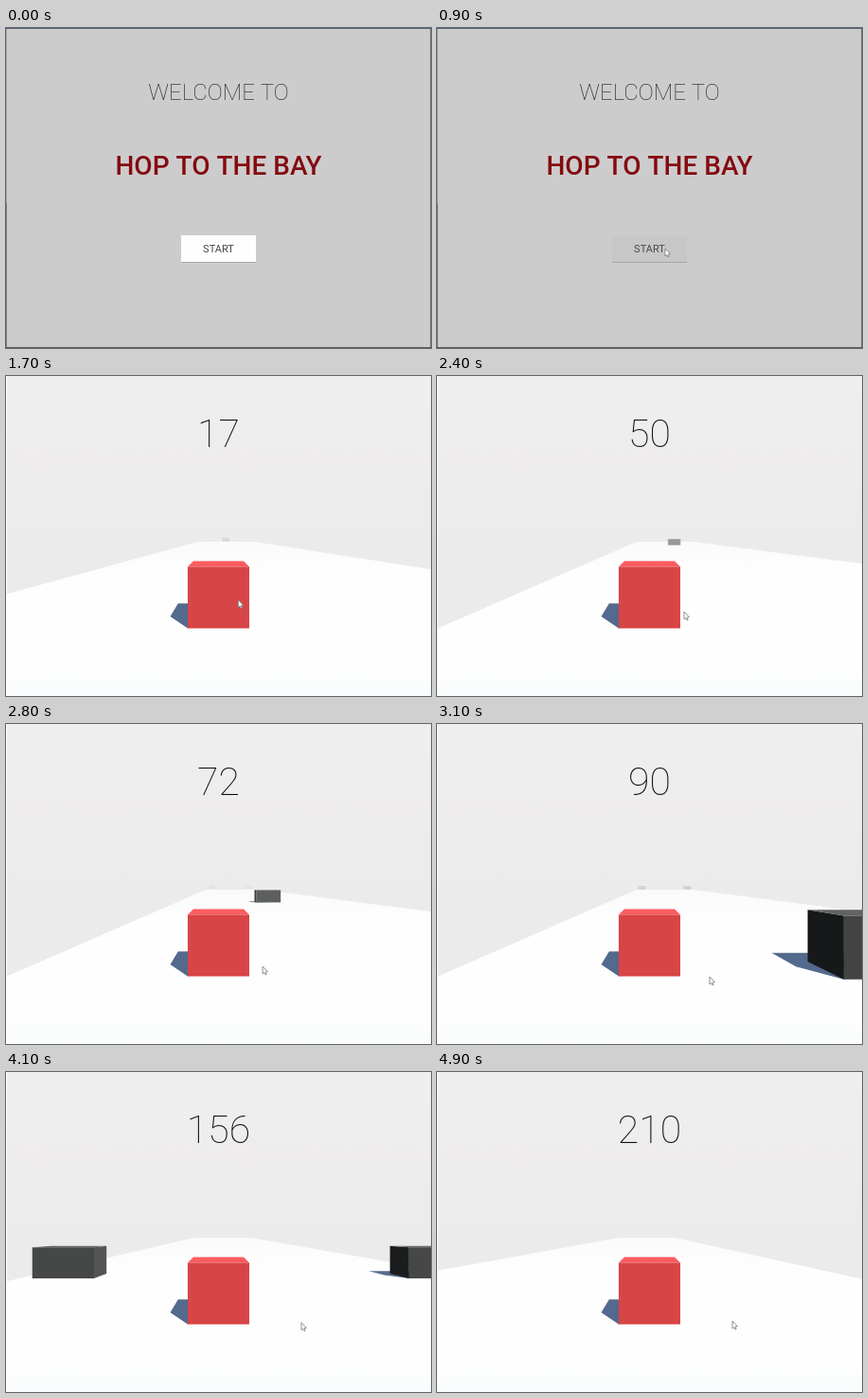
Animation of 449 by 338 pixels, one loop 5000 ms. Source, as an HTML page with a canvas:

```html
<!DOCTYPE html>
<html lang="en">
<head>
<meta charset="utf-8">
<title>Cube runner</title>
<style>
  html, body { margin: 0; width: 100%; height: 100%; overflow: hidden; }
  canvas { display: block; }
</style>
</head>
<body>
<canvas id="stage" width="449" height="338"></canvas>
<script>
const W = 449, H = 338, LOOP = 5000, STEP = 100;
const ctx = document.getElementById('stage').getContext('2d');

// Camera: 60 degree lens, 1.5 units above the ground, 5 units behind the cube
const FOCAL = H / 2 / Math.tan(Math.PI / 6), EYE = 1.5;
const project = (x, y, z) => [W / 2 + x * FOCAL / z, H / 2 + (EYE - y) * FOCAL / z];

const PLAYER = { front: [215, 68, 69], side: [150, 40, 40], right: [190, 60, 60], top: [250, 91, 96] };
const BLOCK = { front: [64, 67, 66], side: [21, 23, 24], right: [78, 81, 80], top: [96, 98, 96] };
const OBSTACLES = [{ x: -6.1, z: 159.5 }, { x: 6.1, z: 159.5 }, { x: 0, z: 89.8 }];

// Keyframes: time in seconds, then values
const STEER = [[1.4, 0], [2, -4.06], [3.25, -4.06], [4.1, -1.07], [4.65, 0.72]];
const MOUSE = [[1.4, 241, 233], [2.4, 261, 249], [2.6, 262, 250], [3.1, 288, 267], [3.8, 312, 265], [4.9, 312, 263]];

function keyed(keys, t) {
  const next = keys.findIndex(k => k[0] > t);
  if (next === 0) return keys[0].slice(1);
  if (next < 0) return keys[keys.length - 1].slice(1);
  const a = keys[next - 1], b = keys[next];
  const p = (t - a[0]) / (b[0] - a[0]), e = p * p * (3 - 2 * p);
  return a.slice(1).map((v, i) => v + (b[i + 1] - v) * e);
}

// Constant push against linear drag
function distance(t) {
  const top = 70.7, lag = 1.05, u = Math.max(0, t - 0.9);
  return top * (u - lag + lag * Math.exp(-u / lag));
}

function foggy(color, z) {
  const f = 1 - Math.exp(-((0.0187 * z) ** 2));
  return `rgb(${color.map(c => Math.round(c + (237 - c) * f))})`;
}

function poly(points, fill) {
  ctx.beginPath();
  points.forEach(p => ctx.lineTo(...p));
  ctx.closePath();
  ctx.fillStyle = fill;
  ctx.fill();
}

function text(str, y, font, color) {
  ctx.font = font + ' Roboto, sans-serif';
  ctx.textAlign = 'center';
  ctx.fillStyle = color;
  ctx.fillText(str, W / 2, y);
}

function rect(x, y, w, h, fill) {
  ctx.fillStyle = fill;
  ctx.fillRect(x, y, w, h);
}

function gradient(y0, y1, ...colors) {
  const g = ctx.createLinearGradient(0, y0, 0, y1);
  colors.forEach((c, i) => g.addColorStop(i / (colors.length - 1), c));
  return g;
}

function box(x, z, width, colors) {
  if (z < 0.3) return;
  const l = x - width / 2, r = x + width / 2, back = z + 1;
  const face = (name, ...corners) => poly(corners.map(c => project(...c)), foggy(colors[name], z));
  if (z < 40) {
    const dx = -0.4, dz = 0.67;
    poly([[l, 0, z], [l + dx, 0, z + dz], [l + dx, 0, back + dz], [r + dx, 0, back + dz], [r, 0, back]]
      .map(c => project(...c)), foggy([82, 104, 140], z));
  }
  if (l > 0) face('side', [l, 0, z], [l, 1, z], [l, 1, back], [l, 0, back]);
  if (r < 0) face('right', [r, 0, z], [r, 1, z], [r, 1, back], [r, 0, back]);
  face('top', [l, 1, z], [r, 1, z], [r, 1, back], [l, 1, back]);
  face('front', [l, 0, z], [r, 0, z], [r, 1, z], [l, 1, z]);
}

function cursor(x, y) {
  ctx.save();
  ctx.translate(x, y);
  poly([[0, 0], [0, 8], [1.8, 6.5], [3, 9], [4.2, 8.4], [3.1, 6], [5.4, 5.7]], '#fff');
  ctx.strokeStyle = '#777';
  ctx.lineWidth = 0.8;
  ctx.stroke();
  ctx.restore();
}

function menu(hover) {
  rect(0, 0, W, H, '#cdcccd');
  rect(0, 0, W, 1, '#56647f');
  rect(0, 1, 1, 184, '#9ba6bf');
  rect(0, 185, 1, 153, '#77797d');
  rect(W - 1, 1, 1, H - 1, '#77797d');
  rect(0, H - 1, W, 1, '#5a5a5c');
  text('WELCOME TO', 76, '100 24px', '#222');
  text('HOP TO THE BAY', 155, '500 28px', '#840a10');
  rect(185, 247, 79, 1, hover ? '#a5a5a5' : '#a9a9a9');
  rect(185, 219, 79, 28, hover ? '#c8c7c7' : '#fefefe');
  text('START', 237, '400 11px', '#484848');
  if (hover) cursor(241, 233);
}

function game(t) {
  const z = distance(t), [camX] = keyed(STEER, t);
  rect(0, 0, W, H, gradient(0, 175, '#f0efef', '#eeeced', '#ecebeb'));
  const l = -7.5 - camX, r = 7.5 - camX;
  poly([project(l, 0, 74), project(r, 0, 74), project(r, 0, 1), project(l, 0, 1)],
    gradient(174, 338, '#fafafa', '#fefefe', '#fefefe', '#fefefe', '#fefefe', '#f9fcfd'));
  OBSTACLES.forEach(o => box(o.x - camX, o.z - z + 5, 2, BLOCK));
  box(0, 4.5, 1, PLAYER);
  rect(0, 0, 1, H, '#fff');
  text(z.toFixed(0), 75, '100 41px', '#111');
  cursor(...keyed(MOUSE, t));
}

function draw(now) {
  const ms = Math.floor(now % LOOP / STEP) * STEP;
  if (ms < 1000) menu(ms >= 900);
  else game(ms / 1000);
  requestAnimationFrame(draw);
}
requestAnimationFrame(draw);
</script>
</body>
</html>
```
